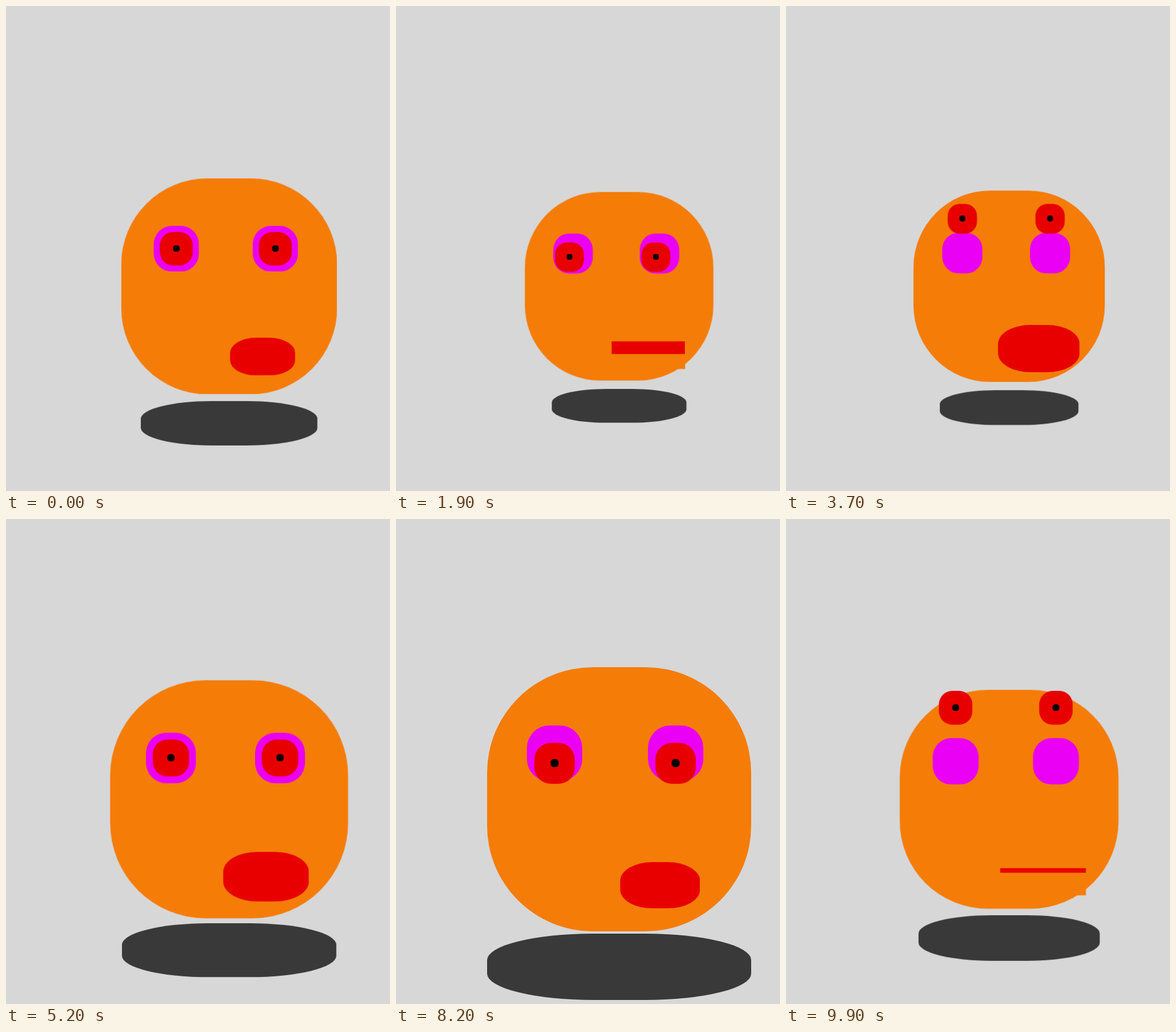
These frames come from a looping animation (666x841 px, 10000 ms). An HTML page:

```html
<!DOCTYPE html>
<html lang="en">
<head>
<meta charset="utf-8">
<title>Floating face</title>
<style>
  :root {
    --skin: #f57c06;
    --red: #e80000;
    --lead: -1.755s;
  }
  html, body {
    margin: 0;
    width: 100%;
    height: 100%;
    overflow: hidden;
    background: #d7d7d7;
  }

  /* Every part is placed by its centre inside the face. */
  .part {
    position: absolute;
    left: var(--x);
    top: var(--y);
    width: var(--w);
    height: var(--h);
    margin: calc(var(--h) / -2) 0 0 calc(var(--w) / -2);
    border-radius: 40%;
    box-sizing: border-box;
  }
  .face {
    --x: 387px; --y: 485.6px; --w: 458px; --h: 458px;
    background: var(--skin);
    animation: float 10s ease var(--lead) infinite;
  }
  .shadow {
    --x: 50%; --y: 519.7px; --w: 458px; --h: 114.5px;
    background: #393939;
    animation: float 10s ease var(--lead) infinite;
  }
  .eye {
    --y: 149.3px; --w: 96px; --h: 97.5px;
    background: #ea00f4;
  }
  .left { --x: 117px; }
  .right { --x: 327.2px; }
  .iris {
    --x: 50%; --y: 50%; --w: 70.5px; --h: 70.5px;
    background: var(--red);
    animation: look 5s ease var(--lead) infinite;
  }
  .pupil {
    --x: 50%; --y: 50%; --w: 14px; --h: 14px;
    background: #000;
  }
  .mouth {
    --x: 300.1px; --y: 378.1px; --w: 138px; --h: 79.7px;
    background: var(--red) padding-box;
    border: 0 solid var(--skin);
    animation: talk 5s ease var(--lead) infinite,
               lips 5s linear var(--lead) infinite;
  }

  @keyframes float {
    0%, 100% { transform: scale(1); }
    50% { transform: scale(.7); }
  }
  @keyframes look {
    0%, 87%, 100% { transform: translate(0, 17.2px); }
    19.5%, 34.3% { transform: translate(0, -112px); }
    34.4%, 42% { transform: none; }
    62%, 67.4% { transform: translate(-17.2px, 0); }
  }
  @keyframes talk {
    0%, 100% { transform: scale(1); }
    19.5% { transform: scale(1.54); }
    28%, 34.3% { transform: scale(1.3); }
    34.4%, 35.2% { transform: scale(1); }
    52.4% { transform: scale(1.54); }
    67.4% { transform: scale(1.05); }
    87% { transform: scale(1.54); }
  }
  /* The lips close as a straight-edged box and open rounded. */
  @keyframes lips {
    0%, 24% { border-radius: 40%; border-block-width: 0; }
    24.1% { border-radius: 0; border-block-width: 0; }
    28%, 34.3% { border-radius: 0; border-block-width: 36.6px; }
    34.4%, 70% { border-radius: 40%; border-block-width: 0; }
    70.1% { border-radius: 0; border-block-width: 0; }
    73.2% { border-radius: 0; border-block-width: 29px; }
    76% { border-radius: 0; border-block-width: 36.6px; }
    81.9% { border-radius: 0; border-block-width: 0; }
    82%, 100% { border-radius: 40%; border-block-width: 0; }
  }
</style>
</head>
<body>
  <div class="part face">
    <div class="part shadow"></div>
    <div class="part eye left">
      <div class="part iris"><div class="part pupil"></div></div>
    </div>
    <div class="part eye right">
      <div class="part iris"><div class="part pupil"></div></div>
    </div>
    <div class="part mouth"></div>
  </div>
</body>
</html>
```
